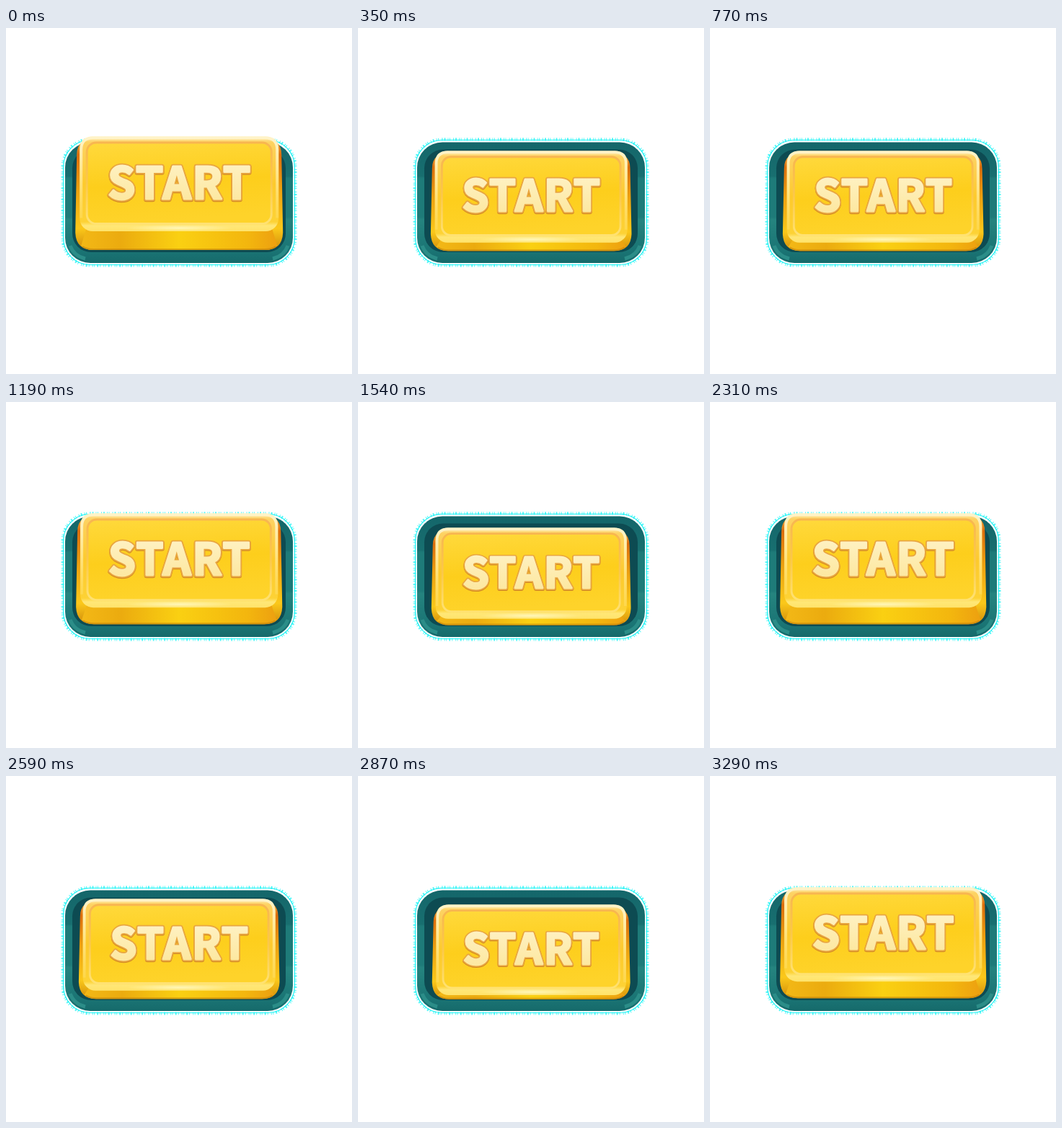
Animation of 480x480 px, one loop 3360 ms. Source, as an HTML page:

```html
<!DOCTYPE html>
<html lang="en">
<head>
<meta charset="utf-8">
<title>Start button</title>
<style>
  html, body { margin: 0; width: 100%; height: 100%; overflow: hidden; background: #fff; }
  svg { display: block; width: 100vw; height: 100vh; }
  text {
    font: 700 61px "Noto Sans CJK SC", "Noto Sans CJK JP", "Noto Sans CJK", "Noto Sans", sans-serif;
    letter-spacing: 2px; text-anchor: middle; stroke-linejoin: round;
  }
</style>
</head>
<body>
<svg viewBox="0 0 480 480">
  <defs>
    <linearGradient id="base" x2="0" y2="1">
      <stop offset="0" stop-color="#14666a"/><stop offset=".28" stop-color="#186f70"/>
      <stop offset=".3" stop-color="#1e7b79"/><stop offset=".62" stop-color="#1e7b79"/>
      <stop offset=".64" stop-color="#25847f"/><stop offset=".9" stop-color="#1a7474"/>
      <stop offset="1" stop-color="#166a6b"/>
    </linearGradient>
    <linearGradient id="side" x2="0" y2="1">
      <stop offset="0" stop-color="#f3a83a"/><stop offset=".12" stop-color="#dc6d0c"/>
      <stop offset=".45" stop-color="#eda20f"/><stop offset=".8" stop-color="#fbc81a"/>
      <stop offset="1" stop-color="#d18c0a"/>
    </linearGradient>
    <linearGradient id="front">
      <stop offset="0" stop-color="#f3b816"/><stop offset=".2" stop-color="#ebab0f"/>
      <stop offset=".5" stop-color="#fad012"/><stop offset=".85" stop-color="#f3b60e"/>
      <stop offset="1" stop-color="#eda010"/>
    </linearGradient>
    <linearGradient id="rim" x2="0" y2="1">
      <stop offset="0" stop-color="#fff1bd"/><stop offset=".06" stop-color="#fdd262"/>
      <stop offset=".5" stop-color="#fdca2c"/><stop offset=".9" stop-color="#fdd235"/>
      <stop offset=".94" stop-color="#ffe777"/><stop offset="1" stop-color="#ffe36a"/>
    </linearGradient>
    <linearGradient id="edge" x2="0" y2="1">
      <stop offset="0" stop-color="#fff3c8"/><stop offset=".5" stop-color="#ffe484"/>
      <stop offset="1" stop-color="#ffe170" stop-opacity=".4"/>
    </linearGradient>
    <linearGradient id="groove" x2="0" y2="1">
      <stop offset="0" stop-color="#f8b650"/><stop offset=".5" stop-color="#fbc84a"/>
      <stop offset="1" stop-color="#ffe272"/>
    </linearGradient>
    <linearGradient id="panel" x2=".15" y2="1">
      <stop offset="0" stop-color="#ffd93c"/><stop offset=".55" stop-color="#fdce1c"/>
      <stop offset="1" stop-color="#fed32a"/>
    </linearGradient>
    <linearGradient id="ink" x2="0" y2="1">
      <stop offset="0" stop-color="#fff5d0"/><stop offset="1" stop-color="#fce596"/>
    </linearGradient>
    <radialGradient id="shine">
      <stop offset="0" stop-color="#fff6b8"/><stop offset="1" stop-color="#fff6b8" stop-opacity="0"/>
    </radialGradient>
  </defs>

  <!-- socket with its ragged cyan fringe -->
  <g fill="none" stroke="#1cf4f6">
    <rect x="79.5" y="155.5" width="321" height="173" rx="37" stroke-width="1.2"/>
    <rect x="78.500" y="154.500" width="323" height="175" rx="38" stroke-width="4" stroke-dasharray="1 2 2 3 1 1.500 1 4" stroke-opacity=".75"/>
  </g>
  <rect x="82" y="158.5" width="316" height="167.5" rx="35" fill="url(#base)"/>
  <path d="M89 302Q94 316 110 320M391 302Q386 316 370 320" fill="none" stroke="#2b8d88" stroke-width="5"/>
  <rect x="92" y="168.5" width="296" height="142.5" rx="26" fill="#0d4b52"/>

  <!-- key, centred on its own origin -->
  <g id="key">
    <path id="skirt" fill="url(#side)"/>
    <path id="apron" fill="url(#front)"/>
    <path id="lip" fill="none" stroke="#b9790a" stroke-width="2" stroke-opacity=".5"/>
    <rect x="-138" y="-67" width="276" height="131.5" rx="18" fill="url(#rim)"/>
    <path d="M-136 46V-49Q-136 -65 -120 -65H120Q136 -65 136 -49V46" fill="none" stroke="url(#edge)" stroke-width="4"/>
    <ellipse cy="60" rx="75" ry="4.500" fill="url(#shine)"/>
    <rect x="-128" y="-58.500" width="256" height="112.500" rx="13" fill="url(#panel)" stroke="url(#groove)" stroke-width="3"/>
    <g id="label">
      <text x="1" y="20.500" fill="#cf8524" stroke="#cf8524" stroke-width="6.500">START</text>
      <text x="1" y="19.500" fill="#e9a640" stroke="#e9a640" stroke-width="6.500">START</text>
      <text x="1" y="19.500" fill="url(#ink)" stroke="url(#ink)" stroke-width="3">START</text>
    </g>
  </g>
</svg>
<script>
  const STEP = 70, PERIOD = 1120;
  const $ = id => document.getElementById(id);

  function draw(ms) {
    const t = Math.floor(ms / STEP) * STEP % PERIOD;
    const press = 1 - Math.abs(1 - t / (PERIOD / 2));
    const scale = 1 - 0.052 * press;
    const y = 217.5 + 28.5 * press;
    const b = (308 + 2 * press - y) / scale;   // the key's foot stays on the socket floor
    $("key").setAttribute("transform", `translate(240.2 ${y}) scale(${scale})`);
    $("skirt").setAttribute("d",
      `M-134 -60Q-142 -54 -142 -42L-144 ${b - 24}Q-143 ${b} -119 ${b}H119Q143 ${b} 144 ${b - 24}L142 -42Q142 -54 134 -60Z`);
    $("apron").setAttribute("d", `M-128 58H128L136 ${b - 6}Q130 ${b} 119 ${b}H-119Q-130 ${b} -136 ${b - 6}Z`);
    $("lip").setAttribute("d", `M-134 ${b - 5}Q-128 ${b - 1} -119 ${b - 1}H119Q128 ${b - 1} 134 ${b - 5}`);
  }

  const start = performance.now();
  function tick() {
    draw(performance.now() - start);
    requestAnimationFrame(tick);
  }
  tick();
</script>
</body>
</html>
```
